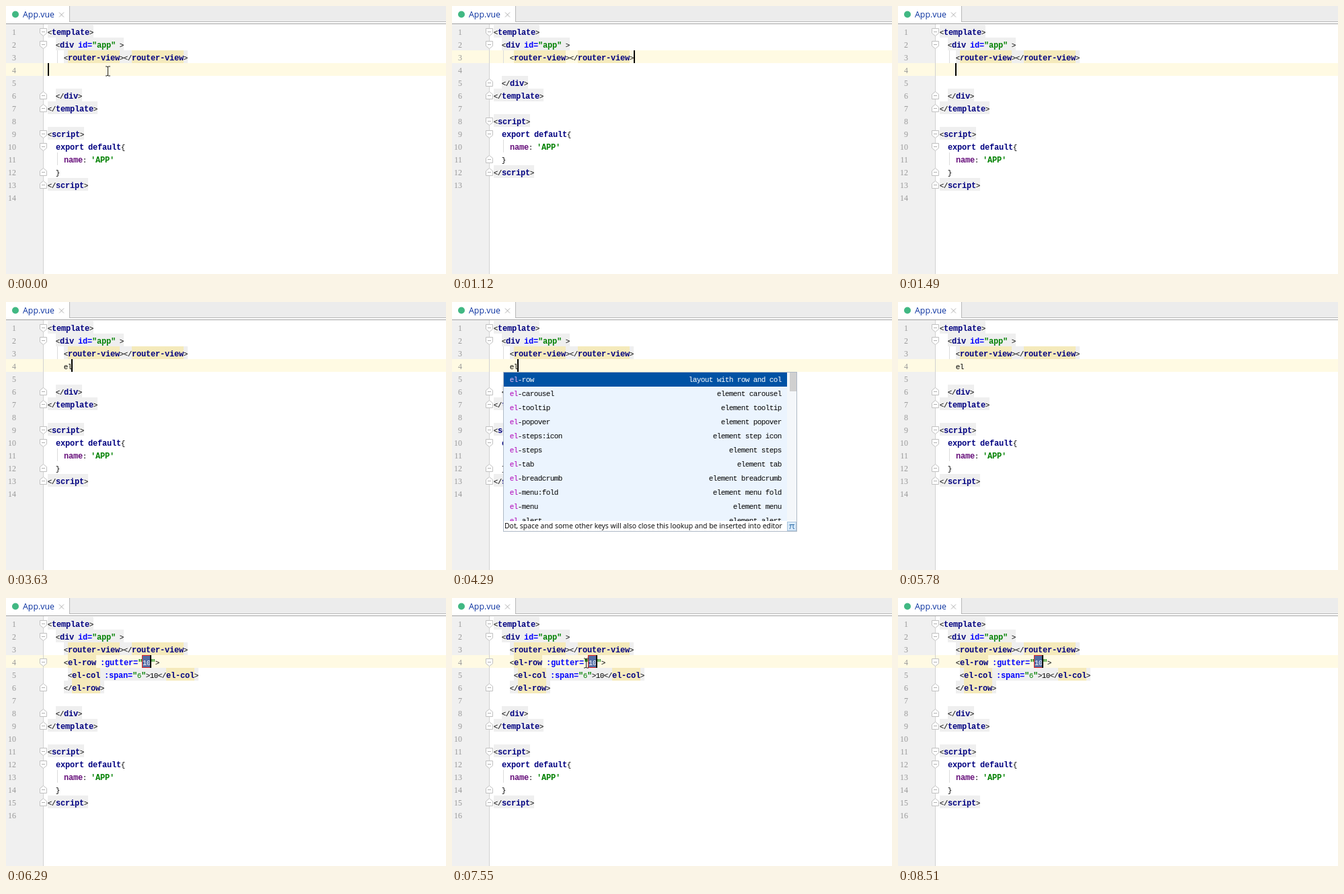
Write an HTML page that moves like this. It is 654 px wide and 399 px high and loops after 8610 ms.

```html
<!DOCTYPE html>
<html lang="en">
<head>
<meta charset="utf-8">
<title>Editor snippet completion</title>
<style>
  html, body { margin: 0; width: 100%; height: 100%; overflow: hidden; background: #fff; }
  svg { display: block; width: 654px; height: 399px; }
  text { white-space: pre; font-family: "Liberation Mono", monospace; text-anchor: middle; }
  .ui { font-family: "Open Sans", sans-serif; text-anchor: start; }
  .num { font: 12px "Liberation Serif", serif; text-anchor: end; fill: #999; }
</style>
</head>
<body>
<svg id="stage" viewBox="0 0 654 399"></svg>
<script>
const LOOP = 8610, ROW = 19, TOP = 28, BASELINE = 15;
const stage = document.getElementById('stage');

// Token styles, keyed by the first character of each token.
const STYLES = {
  p: { color: '#000' },
  k: { color: '#000080', bold: true },
  y: { color: '#000080', bold: true, back: '#f5eabb' },
  a: { color: '#0000ff', bold: true },
  s: { color: '#008000', bold: true },
  d: { color: '#008000' },
  n: { color: '#660e7a', bold: true },
  w: { color: '#fff', back: '#526da5', border: '#e02020' }
};

const POPUP = [
  ['row', 'layout with row and col'], ['carousel', 'element carousel'],
  ['tooltip', 'element tooltip'], ['popover', 'element popover'],
  ['steps:icon', 'element step icon'], ['steps', 'element steps'],
  ['tab', 'element tab'], ['breadcrumb', 'element breadcrumb'],
  ['menu:fold', 'element menu fold'], ['menu', 'element menu'],
  ['alert', 'element alert']
];

const esc = s => s.replace(/&/g, '&amp;').replace(/</g, '&lt;').replace(/>/g, '&gt;');
const rect = (x, y, w, h, fill, more = '') =>
  `<rect x="${x}" y="${y}" width="${w}" height="${h}" fill="${fill}" ${more}/>`;
const path = (d, stroke, fill = 'none') =>
  `<path d="${d}" stroke="${stroke}" fill="${fill}"/>`;
const rowTop = i => TOP + ROW * i;

// Text on a fixed character grid: 7px cells for bold, 6px for regular.
function glyphs(s, x, y, color, bold = false) {
  const cell = bold ? 7 : 6;
  const xs = [...s].map((_, i) => x + cell * (i + 0.5)).join(' ');
  return `<text x="${xs}" y="${y}" fill="${color}" font-size="${bold ? 12 : 11}"` +
    `${bold ? ' font-weight="700"' : ''}>${esc(s)}</text>`;
}

const line = (x, tokens = [], fold = '', guide = false) => ({ x, tokens, fold, guide });

function codeLines(state) {
  const open = state.foldsReady ? 'open' : '', close = state.foldsReady ? 'close' : '';
  const name = state.namesReady ? 'y' : 'k';
  const lines = [
    line(62, ['p<', 'ktemplate', 'p>'], 'open'),
    line(74, ['p<', 'kdiv', 'p ', 'aid=', 's"app"', 'p >'], 'open'),
    line(86, ['p<', 'yrouter-view', 'p></', 'yrouter-view', 'p>'], '', !state.foldsReady)
  ];
  if (state.inserted) lines.push(
    line(86, ['p<', name + 'el-row', 'p ', 'a:gutter=', 's"', 'w10', 's"', 'p>'], open),
    line(92, ['p<', name + 'el-col', 'p ', 'a:span=', 's"', 'd6', 's"', 'p>10</', name + 'el-col', 'p>']),
    line(86, ['p</', name + 'el-row', 'p>'], close)
  );
  else if (!state.joined) lines.push(line(86, state.typed ? ['p' + state.typed] : []));
  lines.push(
    line(62),
    line(74, ['p</', 'kdiv', 'p>'], 'close'),
    line(62, ['p</', 'ktemplate', 'p>'], 'close'),
    line(62),
    line(62, ['p<', 'kscript', 'p>'], 'open'),
    line(74, ['kexport', 'p ', 'kdefault', 'p{'], 'open'),
    line(86, ['nname', 'p: ', "s'APP'"], '', true),
    line(74, ['p}'], 'close'),
    line(62, ['p</', 'kscript', 'p>'], 'close'),
    line(62)
  );
  return lines;
}

function drawLine({ x, tokens, guide }, i, active) {
  const top = rowTop(i), isTag = tokens.length > 1 && tokens[0].startsWith('p<');
  let back = '', front = '', at = x;
  for (const token of tokens) {
    const style = STYLES[token[0]], s = token.slice(1);
    const width = s.length * (style.bold ? 7 : 6);
    if (style.back) back += rect(at, top, width, ROW, style.back);
    if (style.border) back += rect(at - 0.5, top + 0.5, width + 1, ROW - 1, 'none', `stroke="${style.border}"`);
    front += glyphs(s, at, top + BASELINE, style.color, style.bold);
    at += width;
  }
  const tagBack = isTag && !active ? rect(x, top, at - x, ROW, '#efefef') : '';
  const guideLine = guide ? rect(76, top, 1, ROW, '#dcdcdc') : '';
  return tagBack + back + guideLine + front;
}

function foldMark(kind, i) {
  const mid = rowTop(i) + 10.5, dir = kind === 'open' ? 1 : -1;
  const y = d => mid + dir * d;
  return path(`M50.5 ${y(-5)}H60.5V${y(2)}L55.5 ${y(6)}L50.5 ${y(2)}Z`, '#c0c0c0', '#fff') +
    path(`M53 ${mid}H58`, '#b0b0b0');
}

function chrome() {
  return rect(0, 0, 654, 399, '#fff') + rect(95, 0, 559, 23, '#ececec') +
    rect(94, 0, 1, 24, '#b8b8b8') + rect(95, 23, 559, 1, '#b8b8b8') +
    rect(0, 27, 55, 372, '#f0f0f0') + rect(55, 27, 1, 372, '#d2d2d2') +
    rect(0, 26, 654, 1, '#a0a0a0') +
    '<circle cx="14" cy="12.5" r="5" fill="#41b883"/>' +
    '<text class="ui" x="25" y="17" font-size="12.35" fill="#0a32a0">App.vue</text>' +
    path('M79 9.5L86 16.5M86 9.5L79 16.5', '#b0b0b0');
}

const bulb = () =>
  '<circle cx="72.5" cy="76" r="4.5" fill="#ffd75e" stroke="#c69a2c"/>' +
  rect(70.5, 81, 4, 4, '#8a8a8a');

function popup() {
  let out = rect(76.5, 104.5, 436, 237, '#ebf4fe', 'stroke="#aeb9c6"') +
    rect(77, 105, 421, 21, '#0052a4') +
    rect(498, 105, 14, 221, '#f4f7fa') + rect(502, 105, 10, 28, '#d0d0d0');
  POPUP.forEach(([name, hint], i) => {
    const y = 119 + 21 * i, color = i ? '#000' : '#fff';
    out += glyphs('el', 86, y, i ? '#b000b8' : '#f0b8f4') +
      glyphs('-' + name, 98, y, color) + glyphs(hint, 490 - 6 * hint.length, y, color);
  });
  return out + rect(77, 326, 435, 15, '#fff') +
    '<text class="ui" x="78" y="337" font-size="10.45" fill="#000">Dot, space and some other keys ' +
    'will also close this lookup and be inserted into editor</text>' +
    rect(498.5, 327.5, 13, 13, '#d9eafa', 'stroke="#a9c4dc"') +
    path('M501 332.5Q502 331 504 331.5H509M503.5 331.5Q503.5 336 502 338M507 331.5V336Q507 338 509 337.5', '#2f6fa8');
}

const mouse = ([x, y]) => path(
  `M${x - 3} ${y - 7}H${x - 1}L${x} ${y - 6}L${x + 1} ${y - 7}H${x + 4}` +
  `M${x + 0.5} ${y - 6}V${y + 6}M${x - 3} ${y + 7}H${x - 1}L${x} ${y + 6}L${x + 1} ${y + 7}H${x + 4}`, '#222');

// The pointer leaves the editor towards the lower right in 120ms steps.
function pointer(t) {
  if (t < 1120) return [151, 97];
  if (t < 7550 || t >= 8390) return null;
  const u = Math.floor((t - 7550) / 120) / 6;
  return [Math.round(199 + 399 * u), Math.round(97 + 230 * u + 63 * u * u)];
}

function stateAt(t) {
  const within = (a, b) => t >= a && t < b;
  const inserted = t >= 5900, joined = within(1120, 1490);
  const typed = t < 3380 ? '' : t < 3630 ? 'e' : 'el';
  const hidden = [[370, 870], [2490, 2990], [5030, 5530], [5780, 5900], [7050, 7550], [8030, 8510]];
  return {
    inserted, joined, typed,
    foldsReady: t >= 6150,
    namesReady: t >= 6290,
    bulb: within(250, 1120),
    popup: within(4290, 5780),
    caretOn: !hidden.some(([a, b]) => within(a, b)),
    caretX: t < 1120 ? 62 : joined ? 270 : inserted ? 214 : 85 + 6 * typed.length,
    activeRow: joined ? 2 : 3,
    mouse: pointer(t)
  };
}

function draw(state) {
  const activeTop = rowTop(state.activeRow);
  let out = chrome() + rect(0, activeTop, 55, ROW, '#fffae3') +
    rect(56, activeTop, 598, ROW, '#fffae3');
  codeLines(state).forEach((l, i) => {
    out += `<text class="num" x="15" y="${rowTop(i) + BASELINE}">${i + 1}</text>` +
      drawLine(l, i, i === state.activeRow);
    if (l.fold) out += foldMark(l.fold, i);
  });
  if (state.caretOn) out += rect(state.caretX, activeTop, 2, ROW, '#000');
  if (state.bulb) out += bulb();
  if (state.popup) out += popup();
  if (state.mouse) out += mouse(state.mouse);
  stage.innerHTML = out;
}

let shown = '';
function tick() {
  const state = stateAt(performance.now() % LOOP), key = JSON.stringify(state);
  if (key !== shown) {
    shown = key;
    draw(state);
  }
  requestAnimationFrame(tick);
}
tick();
</script>
</body>
</html>
```
